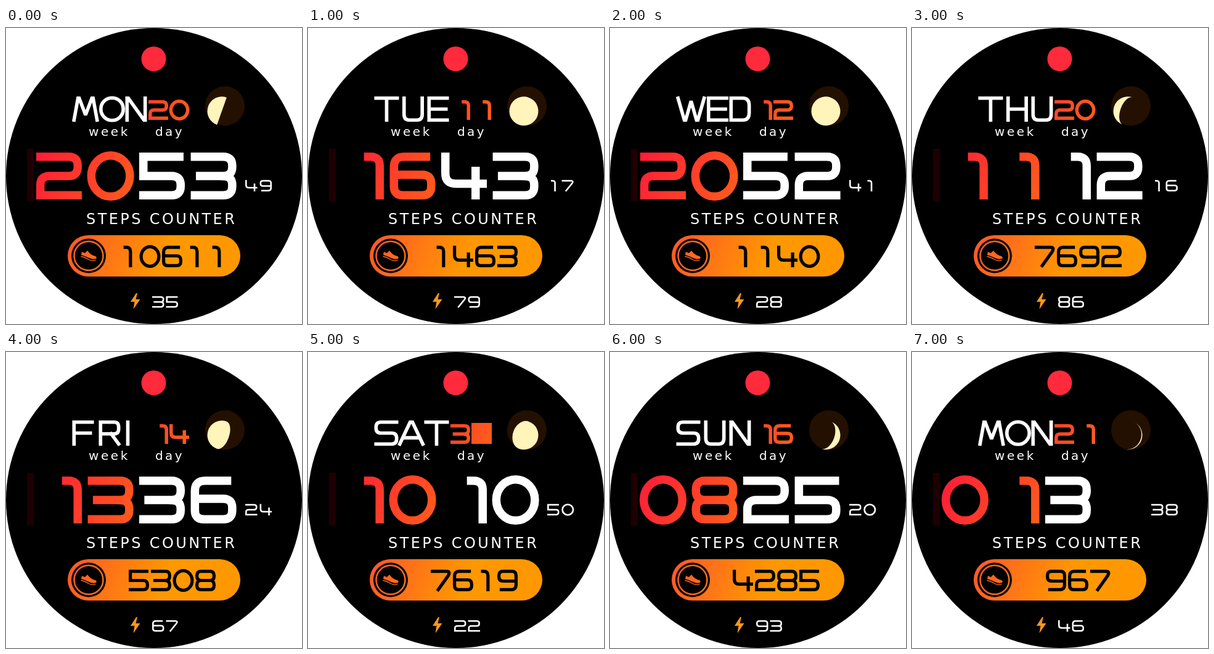
Recreate the animation shown at these times as an HTML page with a canvas. Size 480x480 px, loop 8 s.

```html
<!DOCTYPE html>
<html lang="en">
<head>
<meta charset="utf-8">
<title>Watch face</title>
<style>
  html, body { margin: 0; width: 100%; height: 100%; overflow: hidden; background: #fff; }
  canvas { display: block; }
</style>
</head>
<body>
<canvas id="face" width="480" height="480"></canvas>
<script>
const ctx = document.getElementById('face').getContext('2d');

// Glyph centrelines in a 58 x 60 box
const GLYPHS = {
  0: 'M29-2a30 32 0 0 1 0 64a30 32 0 0 1 0-64z',
  1: 'M40 0H44q14 0 14 14V60',
  2: 'M0 0H44q14 0 14 14v2q0 14-14 14H14q-14 0-14 14V60H58',
  3: 'M0 0H44q14 0 14 14v2q0 14-14 14H8M44 30q14 0 14 14v2q0 14-14 14H0',
  4: 'M0 0V26q0 16 16 16H58M47 22V60',
  5: 'M56 0H0V30H44q14 0 14 14v2q0 14-14 14H0',
  6: 'M50 0H16q-16 0-16 16V46q0 14 14 14H44q14 0 14-14v-4q0-14-14-14H0',
  7: 'M0 0H48Q62 0 54 14L20 60',
  8: 'M14 0H44q14 0 14 14v2q0 14-14 14H14q-14 0-14-14v-2q0-14 14-14zM14 30q-14 0-14 14v2q0 14 14 14H44q14 0 14-14v-2q0-14-14-14',
  9: 'M8 60H42q16 0 16-16V14q0-14-14-14H14q-14 0-14 14v4q0 14 14 14H58',
  A: 'M0 60L26 0H32L58 60M12 43H46',
  D: 'M0 0H38q20 0 20 20V40q0 20-20 20H0z',
  E: 'M58 0H0V60H58M0 30H54',
  F: 'M58 0H0V60M0 30H52',
  H: 'M0 0V60M58 0V60M0 30H58',
  I: 'M29 0V60',
  M: 'M0 60L10 0H13L29 46L45 0H48L58 60',
  N: 'M0 60V0H4L54 60H58V0',
  O: 'M29-1a29 31 0 0 1 0 62a29 31 0 0 1 0-62z',
  R: 'M0 60V0H44q14 0 14 14v4q0 14-14 14H0M34 32L58 60',
  S: 'M58 0H14q-14 0-14 14v2q0 14 14 14H44q14 0 14 14v2q0 14-14 14H0',
  T: 'M0 0H58M29 0V60',
  U: 'M0 0V44q0 16 16 16H42q16 0 16-16V0',
  W: 'M0 0L14 60H17L29 8L41 60H44L58 0'
};
const LETTER_WIDTH = { A: 43, I: 8, M: 43, O: 42, S: 39, T: 40, W: 48 };

// lit: side of the moon that shines; edge: 1 = new, 0 = half, -1 = full
const SCENES = [
  { week: 'MON', day: '20', hour: '20', min: '53', sec: '49', steps: '10611', power: '35', lit: -1, edge: 0 },
  { week: 'TUE', day: '11', hour: '16', min: '43', sec: '17', steps: '1463', power: '79', lit: 1, edge: -1 },
  { week: 'WED', day: '12', hour: '20', min: '52', sec: '41', steps: '1140', power: '28', lit: 1, edge: -1 },
  { week: 'THU', day: '20', hour: '11', min: '12', sec: '16', steps: '7692', power: '86', lit: -1, edge: .52 },
  { week: 'FRI', day: '14', hour: '13', min: '36', sec: '24', steps: '5308', power: '67', lit: -1, edge: -.5 },
  { week: 'SAT', day: '3■', hour: '10', min: '10', sec: '50', steps: '7619', power: '22', lit: 1, edge: -.76 },
  { week: 'SUN', day: '16', hour: '08', min: '25', sec: '20', steps: '4285', power: '93', lit: 1, edge: .6 },
  { week: 'MON', day: '21', hour: '01', min: '3', sec: '38', steps: '967', power: '46', lit: 1, edge: .93 }
];

function gradient(x0, y0, x1, y1, from, to) {
  const g = ctx.createLinearGradient(x0, y0, x1, y1);
  g.addColorStop(0, from);
  g.addColorStop(1, to);
  return g;
}
const hourPaint = gradient(49, 202, 206, 278, '#ff1c38', '#ff5c1c');
const dayPaint = gradient(231, 117, 298, 149, '#fa4229', '#ff5e1c');
const pillPaint = gradient(110, 336, 250, 390, '#ff5a28', '#ff9800');
const boltPaint = gradient(202, 430, 217, 456, '#ff8a14', '#ffa51a');

function disc(x, y, r, color) {
  ctx.fillStyle = color;
  ctx.beginPath();
  ctx.arc(x, y, r, 0, 2 * Math.PI);
  ctx.fill();
}

function fillPath(d, color) {
  ctx.fillStyle = color;
  ctx.fill(new Path2D(d));
}

function glyph(char, x, y, w, h, weight, paint) {
  if (char === '■') {
    ctx.fillStyle = paint;
    ctx.fillRect(x, y - 2, w + 1, h + 2);
    return;
  }
  const path = new Path2D();
  path.addPath(new Path2D(GLYPHS[char]), new DOMMatrix([
    (w - weight) / 58, 0, 0, (h - weight) / 60, x + weight / 2, y + weight / 2]));
  ctx.lineWidth = weight;
  ctx.strokeStyle = paint;
  ctx.stroke(path);
}

function number(digits, x, y, { w, h, pitch, weight, paint, centreOnes }) {
  [...digits].forEach((char, i) => {
    const shift = centreOnes && char === '1' ? -.29 * w : 0;
    glyph(char, x + i * pitch + shift, y, w, h, weight, paint);
  });
}

const BIG = { w: 74, h: 76, pitch: 83.6, weight: 13.5 };
const HOURS = { ...BIG, paint: hourPaint };
const MINUTES = { ...BIG, paint: '#fff' };
const DAY = { w: 32, h: 32, pitch: 34, weight: 5.5, paint: dayPaint };
const STEPS = { w: 33, h: 35, pitch: 36, weight: 5.2, paint: '#000', centreOnes: true };
const SMALL = { w: 19.5, h: 18.5, pitch: 23.5, weight: 2.6, paint: '#fff', centreOnes: true };

function weekday(name) {
  const widths = [...name].map(c => LETTER_WIDTH[c] || 35);
  const total = widths.reduce((a, b) => a + b);
  const gap = Math.min(8, (121 - total) / 2);
  let x = 107.5;
  [...name].forEach((char, i) => {
    glyph(char, x, 111, widths[i], 41, 5.6, '#fff');
    x += widths[i] + gap;
  });
}

function moon(lit, edge) {
  disc(355, 126.5, 32, '#241000');
  ctx.save();
  ctx.translate(350, 134.8);
  ctx.rotate(.34);
  ctx.scale(lit, 1);
  ctx.fillStyle = '#fff4ba';
  ctx.beginPath();
  ctx.arc(0, 0, 23.5, -Math.PI / 2, Math.PI / 2);
  ctx.ellipse(0, 0, 23.5 * Math.abs(edge), 23.5, 0, Math.PI / 2, -Math.PI / 2, edge > 0);
  ctx.fill();
  ctx.restore();
}

function label(text, x, y, size, spacing) {
  ctx.font = `${size}px "DejaVu Sans", sans-serif`;
  ctx.letterSpacing = spacing + 'px';
  ctx.fillStyle = '#fff';
  ctx.fillText(text, x, y);
}

function stepsPill() {
  ctx.fillStyle = pillPaint;
  ctx.beginPath();
  ctx.roundRect(100, 336, 280, 67, 33.5);
  ctx.fill();
  disc(134, 369.5, 28, '#000');
  ctx.strokeStyle = pillPaint;
  ctx.lineWidth = 2.5;
  ctx.beginPath();
  ctx.arc(134, 369.5, 23.5, 0, 2 * Math.PI);
  ctx.stroke();
  fillPath('M123 363l5 2 4-4q6 8 13 9 3 2 1 4-5 2-11-1-6-3-13-5z', pillPaint);
  ctx.lineWidth = 1.3;
  ctx.stroke(new Path2D('M122 370.5q8 2 12 5 6 3 11 1'));
}

function draw(scene) {
  ctx.clearRect(0, 0, 480, 480);
  ctx.lineCap = 'square';
  ctx.miterLimit = 1.5;
  disc(240, 240, 240, '#000');
  disc(239.5, 50, 20, '#ff2a3c');

  weekday(scene.week);
  number(scene.day, 231, 117, DAY);
  moon(scene.lit, scene.edge);
  label('week', 134, 175, 20, 3.6);
  label('day', 242, 175, 20, 3.4);

  ctx.fillStyle = '#1e0004';
  ctx.fillRect(34, 196, 11, 85);
  number(scene.hour, 49, 202, HOURS);
  number(scene.min, 216, 202, MINUTES);
  number(scene.sec, 388, 246.5, SMALL);

  label('STEPS COUNTER', 130, 317.5, 24, 3.4);
  stepsPill();
  number(scene.steps, 271 - scene.steps.length * 18, 353, STEPS);

  fillPath('M211 430L202 444H208.5L206.5 456L217.5 440H210.5L213 430Z', boltPaint);
  number(scene.power, 237, 435, { ...SMALL, pitch: 22.5 });
}

const start = performance.now();
function tick() {
  const elapsed = performance.now() - start;
  draw(SCENES[Math.floor(elapsed / 1000) % SCENES.length]);
  requestAnimationFrame(tick);
}
tick();
</script>
</body>
</html>
```
